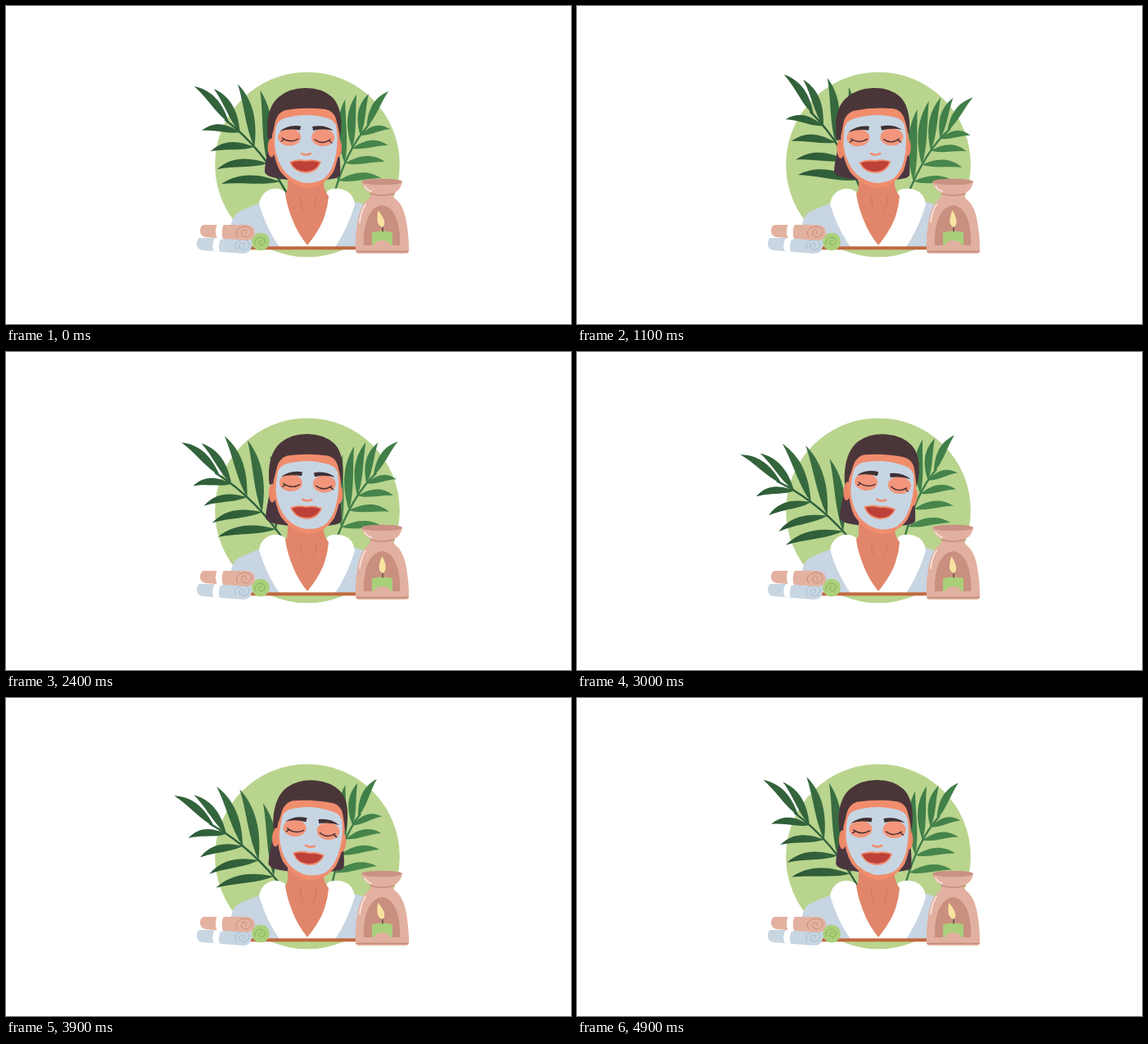
An HTML page that plays this animation: 690 by 388 pixels, repeating every 5 s.

```html
<!DOCTYPE html>
<html lang="en">
<head>
<meta charset="utf-8">
<title>Spa mask</title>
<style>
html, body { margin: 0; width: 100%; height: 100%; overflow: hidden; background: #fff; }
svg { display: block; width: 100%; height: 100%; }
.line { fill: none; stroke-linecap: round; stroke-linejoin: round; }
</style>
</head>
<body>
<svg viewBox="0 0 690 388">
  <defs>
    <linearGradient id="leafL" gradientUnits="userSpaceOnUse" x1="240" y1="190" x2="330" y2="130">
      <stop offset="0" stop-color="#2a5735"/><stop offset="1" stop-color="#3b7042"/>
    </linearGradient>
    <linearGradient id="leafR" gradientUnits="userSpaceOnUse" x1="410" y1="130" x2="460" y2="210">
      <stop offset="0" stop-color="#3f7d48"/><stop offset="1" stop-color="#4a8a4d"/>
    </linearGradient>
  </defs>

  <circle cx="368" cy="193.5" r="112.8" fill="#b9d48d"/>
  <g id="palmL" fill="url(#leafL)" stroke="#2d5f3d"></g>
  <g id="palmR" fill="url(#leafR)" stroke="#3d7c49"></g>

  <path id="hair" fill="#4b3640" d="M323 150C322 175 316 188 316 203Q318 208 330 210L350 213H384L398 211Q407 210 408 206C409 196 407 180 405 150Z"/>

  <!-- robe and neck -->
  <path fill="#c8d5e2" d="M272 294Q272 260 283 252Q296 245 315 239L368 262L422 238Q434 240 445 247V294Z"/>
  <path fill="#fff" d="M309 241Q311 230 320 225Q331 220 340 226L368 270L393 225Q401 221 412 224Q424 228 426 242Q417 272 402 294H334Q318 272 309 241Z"/>
  <path fill="#e1866a" d="M344 196V218Q344 226 341 229Q343 244 350 261Q356 277 368 292Q381 276 387 262Q393 247 394 232Q389 226 388 218V196Z"/>
  <path class="line" stroke="#c9735c" stroke-width=".8" d="M359 232Q360 243 363 250M379 232Q379 243 375 250"/>

  <g id="head">
    <ellipse cx="324" cy="173" rx="4.500" ry="11.500" fill="#ec8768"/>
    <ellipse cx="405.500" cy="173" rx="4.500" ry="11.500" fill="#ec8768"/>
    <path fill="#f08d6d" d="M326 138Q340 118 366 118Q393 118 405 138C409 160 408 183 400 202Q388 221 368 222Q350 220 335 202C325 184 323 160 326 138Z"/>
    <path fill="#4a3639" d="M320 163C317 140 321 121 333 111Q346 100 366 100Q386 100 398 111C410 122 411 146 408 161Q406 149 403 138Q400 128 390 126Q366 123 341 127Q332 130 329 140Q327 150 324 161Z"/>
    <path fill="#c7d5e3" d="M330 146Q333 137 348 135Q366 131 385 135Q400 137 403 146Q406 162 403 180Q400 201 388 211Q379 216 367 216Q354 215 342 204Q330 190 328 170Q328 155 330 146Z"/>
    <ellipse cx="346" cy="160" rx="14" ry="10.500" fill="#f2957a"/>
    <ellipse cx="387" cy="160.500" rx="14" ry="10.500" fill="#f2957a"/>
    <path fill="#3f3034" d="M334 153Q345 144 360 146.500L359 151.500Q346 149 334 153ZM374 147Q389 144 400 152Q388 149 375 152Z"/>
    <path class="line" stroke="#4a3035" stroke-width="1.4" d="M337 161Q347 168 357 162M339 163L336 165M377 163Q386 170 396 163M394 164L398 167"/>
    <path class="line" stroke="#f08d6d" stroke-width="2.6" d="M361 180Q366 183 372 180"/>
    <path fill="#f08d6d" d="M346 190Q356 186 366 188Q376 186 385 190Q380 204 366 204Q351 203 346 190Z"/>
    <path fill="#bd4039" d="M348 191Q357 188 366 190Q375 188 383 191Q378 202 366 202Q353 202 348 191Z"/>
  </g>

  <rect x="296" y="293.3" width="134" height="4" fill="#c1693f"/>

  <!-- towels -->
  <circle cx="311" cy="287.5" r="10.8" fill="#abd07b"/>
  <path class="line" stroke="#86b25a" d="M304 291Q303 283 311 282Q317 283 316 289Q313 294 309 290Q308 286 312 286"/>
  <path fill="#c8d6e2" d="M236 283H290Q300 285 300 293Q299 302 289 302L239 298Q233 296 233 290Q233 285 236 283Z"/>
  <path fill="#fff" d="M255 283H263Q258 291 261 300L254 299Q250 291 255 283Z"/>
  <path class="line" stroke="#a5bccf" d="M281 297Q276 288 288 285Q298 285 297 293Q292 301 285 295Q284 289 290 289Q293 292 289 294"/>
  <path fill="#e3b1a0" d="M241 267H293Q304 268 304 277Q303 286 293 286L243 282Q237 280 237 274Q237 269 241 267Z"/>
  <path fill="#fff" d="M258 266H266Q262 275 265 285L258 284Q254 275 258 266Z"/>
  <path class="line" stroke="#c98c79" d="M283 282Q277 273 290 269Q301 269 300 277Q295 285 288 280Q286 274 292 273Q296 276 292 278"/>

  <!-- burner -->
  <path fill="#e2b0a0" d="M434 214Q437 225 445 228Q447 231 443 235Q432 243 429 265Q426 282 427 298Q427 302 431 302H488Q492 302 492 298Q492 280 489 264Q486 243 475 235Q471 231 474 228Q482 225 484 214Z"/>
  <ellipse cx="459" cy="214.5" rx="25" ry="3.8" fill="#ca9282"/>
  <path class="line" stroke="#c58d79" stroke-width="1.4" d="M445 229Q459 233 474 229"/>
  <path class="line" stroke="#f7e3da" stroke-width="1.8" d="M438 220Q441 225 446 226M439 242Q433 251 432 264"/>
  <path fill="#c98f7f" d="M437 292Q436 275 441 260Q448 244 459 243Q471 244 477 260Q482 275 481 292Z"/>
  <path fill="#a9cf7a" d="M447 276Q459 273 472 276V292H447Z"/>
  <path fill="#e2b0a0" d="M449 293Q451 286 459.500 286Q468 286 470 293Z"/>
  <path class="line" stroke="#53403a" stroke-width="1.3" d="M460 275V268"/>
  <path id="flame" fill="#f8e3a0" d="M460 270Q455 267 456 261Q457 255 460 249Q464 257 464 263Q464 268 460 270Z"/>
  <path class="line" stroke="#c28975" stroke-width="1.3" d="M428 299.500H491"/>
</svg>
<script>
const $ = id => document.getElementById(id);

// Point at u on the quadratic curve a, b, c
const along = ([a, b, c], u) => [0, 1].map(k =>
  (1 - u) ** 2 * a[k] + 2 * u * (1 - u) * b[k] + u * u * c[k]);

// Leaf outline; bend arches it to one side, more so towards the tip
function leaf([bx, by], [tx, ty], bend) {
  const dx = tx - bx, dy = ty - by, len = Math.hypot(dx, dy);
  const at = (u, off) => `${bx + dx * u - dy / len * off} ${by + dy * u + dx / len * off} `;
  const w = 4 + len / 25;
  return `M${bx} ${by}C${at(.3, bend * .4 + w)}${at(.65, bend * 1.4 + w)}${tx} ${ty}` +
    `C${at(.65, bend * 1.4 - w)}${at(.3, bend * .4 - w)}${bx} ${by}Z`;
}

// Leaves join the stem to tips spread along an upper and a lower curve
function palm(id, stem, tip, upper, lower, bend) {
  let d = leaf(along(stem, .05), tip, bend);
  for (const tips of [upper, lower])
    for (let i = 0; i < 4; i++)
      d += leaf(along(stem, .2 + i * .21), along(tips, i / 3), bend);
  $(id).innerHTML = `<path class="line" stroke-width="2.4" d="M${stem[0]}Q${stem[1]} ${stem[2]}"/>` +
    `<path stroke="none" d="${d}"/>`;
}

palm('palmL', [[268, 139], [314, 174], [346, 234]], [230, 98],
  [[254, 101], [299, 82], [336, 124]], [[239, 152], [257, 193], [263, 217]], 6);
palm('palmR', [[443, 145], [416, 174], [400, 232]], [467, 104],
  [[443, 107], [420, 104], [401, 125]], [[469, 150], [466, 180], [458, 210]], -5);

// Degrees at t seconds: a slow swing peaking at p, plus a faster one peaking at q
const wave = (t, peak, turns) => Math.cos(2 * Math.PI * turns * (t - peak) / 5);
const swing = (mid, a, p, b, q) => t => mid + a * wave(t, p, 1) + b * wave(t, q, 2);

const parts = {
  palmL: { pivot: '352 266', angle: swing(-2.4, 9.3, .95, 1.3, 1.5) },
  palmR: { pivot: '401 263', angle: swing(1.2, 6.3, 1.45, 1.3, 2) },
  head: { pivot: '366 240', angle: swing(1.3, 3.8, 3.55, .95, .75) },
  flame: { pivot: '460 270', angle: swing(-9, 9, 1.9, 0, 0) }
};

function draw(ms) {
  const t = Math.floor(ms / 100) % 50 / 10; // ten poses a second
  for (const id in parts)
    $(id).setAttribute('transform', `rotate(${parts[id].angle(t)} ${parts[id].pivot})`);
  $('hair').setAttribute('transform', `translate(${parts.head.angle(t)})`);
}

const start = performance.now();
function tick() {
  draw(performance.now() - start);
  requestAnimationFrame(tick);
}
tick();
</script>
</body>
</html>
```
